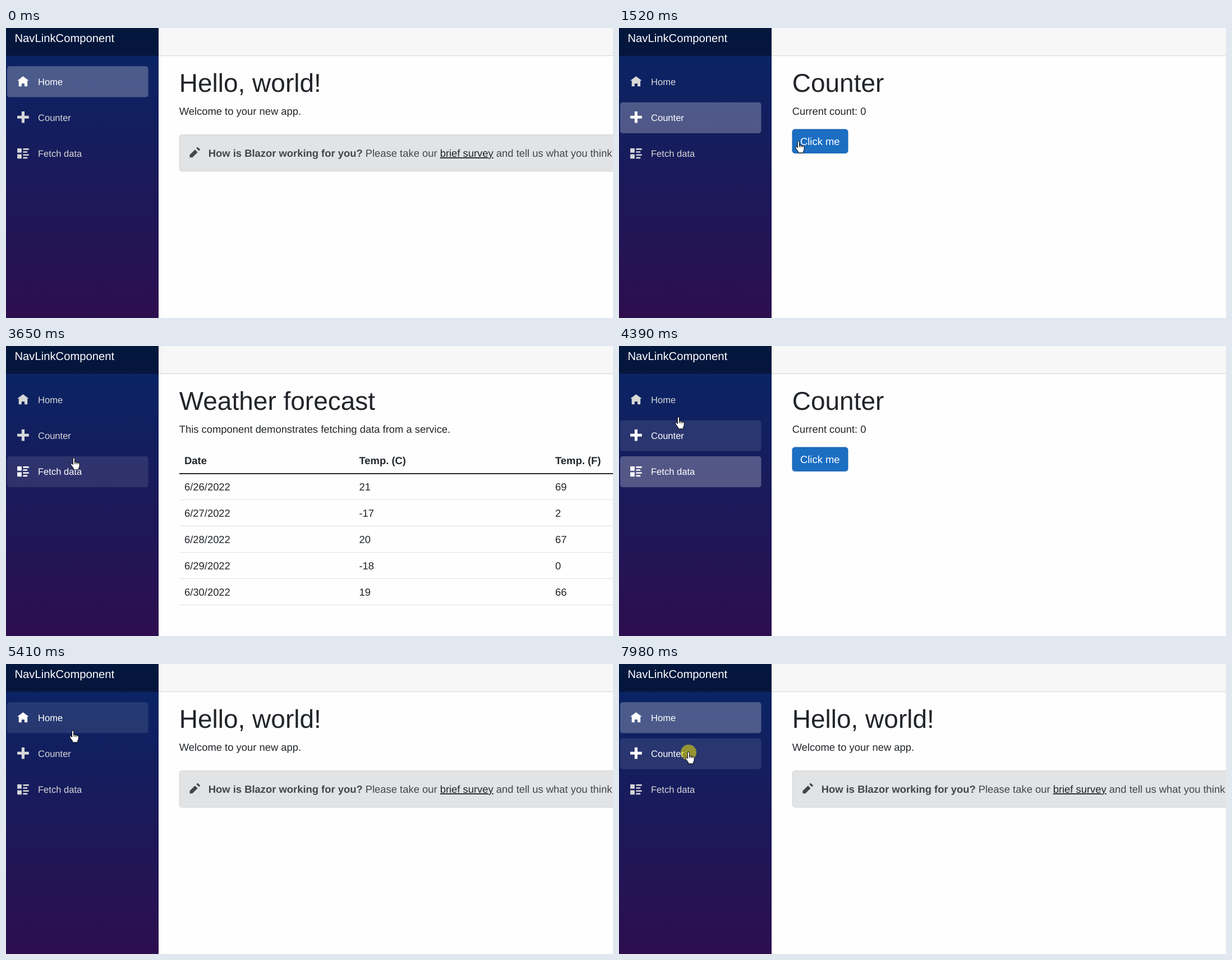
These frames come from a looping animation (1082 by 518 pixels, 8 s). An HTML page:

```html
<!DOCTYPE html>
<html lang="en">
<head>
<meta charset="utf-8">
<title>NavLinkComponent</title>
<style>
  html, body { margin: 0; height: 100%; overflow: hidden; }
  svg { display: block; width: 100vw; height: 100vh; cursor: default;
        font: 18.4px "Liberation Sans", Arial, sans-serif; text-rendering: geometricPrecision; }
  #pages { fill: #212529; }
  .h1 { font-size: 46px; }
  .alert { fill: #41464b; }
  .link { fill: #212529; text-decoration: underline; }
  .nav { font-size: 16.56px; fill: #d7d7d7; }
  .nav rect { fill: #fff; fill-opacity: 0; }
  .nav.active, .nav.hover { fill: #fff; }
  .nav.active rect { fill-opacity: .26; }
  .nav.hover rect { fill-opacity: .1; }
</style>
</head>
<body>
<svg viewBox="0 0 1082 518">
  <defs>
    <linearGradient id="side" gradientUnits="userSpaceOnUse" x1="0" y1="-15" x2="0" y2="690">
      <stop stop-color="#052767"/><stop offset="1" stop-color="#3a0647"/>
    </linearGradient>
  </defs>
  <rect width="1082" height="518" fill="#fefefe"/>
  <rect x="272" width="810" height="49" fill="#f7f7f7"/>
  <rect x="272" y="49" width="810" height="1" fill="#d6d5d5"/>
  <rect width="272" height="518" fill="url(#side)"/>
  <rect width="272" height="49.5" fill-opacity=".4"/>
  <text x="15.5" y="25" font-size="20.24" fill="#fff">NavLinkComponent</text>
  <g id="nav"></g>

  <g id="pages">
    <g>
      <text class="h1" x="308.7" y="114">Hello, world!</text>
      <text x="308.7" y="155">Welcome to your new app.</text>
      <rect x="309" y="190.5" width="900" height="65.5" rx="4.6" fill="#e2e3e5" stroke="#d3d6d8"/>
      <path class="alert" transform="translate(327.5 212.5) scale(2.35)" d="M6 0l-1 1 2 2 1-1-2-2zm-2 2l-4 4v2h2l4-4-2-2z"/>
      <text class="alert" x="360.8" y="230"><tspan font-weight="bold">How is Blazor working for you?</tspan> Please take our <tspan class="link">brief survey</tspan> and tell us what you think.</text>
    </g>
    <g>
      <text class="h1" x="308.7" y="114">Counter</text>
      <text id="count" x="308.7" y="155"></text>
      <rect x="309" y="181" width="99" height="42.6" rx="4.6" fill="#1b6ec2" stroke="#1861ac"/>
      <text x="323" y="209" fill="#fff">Click me</text>
    </g>
    <g id="weather">
      <text class="h1" x="308.7" y="114">Weather forecast</text>
      <text x="308.7" y="155">This component demonstrates fetching data from a service.</text>
    </g>
  </g>

  <circle id="press" r="14" fill="#ebe100" fill-opacity=".55"/>
  <g id="cursor" fill="#fff" stroke="#000" stroke-linejoin="round">
    <path d="M0 0V17l4-3.7 2.7 6 2.6-1.1-2.6-5.9h5.4z"/>
    <path d="M-1.7 .5a1.6 1.6 0 0 1 3.2 0V6l2 .4 2.5.6 2.3.7 1.8 1.5v5l-1.5 3v2.8H-.6V17.5L-4.5 12.5-5.6 10c0-1.6 1.8-1.6 2.6-.6l1.3 1.6zM1.5 6v4M4.2 6.6v3.6M6.8 7.3v3"/>
  </g>
</svg>
<script>
const LOOP = 8000, PRESS = 140, NAV_LAG = 100, APPEAR = 200;
const HOME = 0, COUNTER = 1, FETCH = 2;
const PITCH = 64.4, ROW = 47.1;
const $ = id => document.getElementById(id);
const show = (el, on) => el.setAttribute('visibility', on ? 'visible' : 'hidden');

// Label, icon height in units, icon path
const links = [
  ['Home', 7, 'M4 0l-4 3h1v4h2v-2h2v2h2v-4.03l1 .03-4-3z'],
  ['Counter', 8, 'M3 0v3h-3v2h3v3h2v-3h3v-2h-3v-3h-2z'],
  ['Fetch data', 7, 'M0 0v3h3v-3h-3zm4 0v1h4v-1h-4zm0 2v1h3v-1h-3zm-4 2v3h3v-3h-3zm4 0v1h4v-1h-4zm0 2v1h3v-1h-3z']
];
$('nav').innerHTML = links.map(([label, height, icon], i) => {
  const middle = 95.9 + i * PITCH;
  return `<g class="nav">
    <rect x="2" y="${middle - 27.6}" width="251.5" height="55.2" rx="4.6"/>
    <path transform="translate(20.1 ${middle - 1 - height * 1.3 + (height === 7 ? .5 : 0)}) scale(2.58)" d="${icon}"/>
    <text x="57" y="${Math.round(middle + 5.7)}">${label}</text></g>`;
}).join('');

function forecast(day) {
  const celsius = (day * 37 + 4) % 75 - 20;
  return [`6/${25 + day}/2022`, celsius, 32 + Math.trunc(celsius / .5556)];
}

function tableRow(cells, i) {
  const y = 180.5 + i * ROW, head = i === 0;
  const texts = cells.map((cell, c) =>
    `<text x="${[318, 629.5, 979][c]}" y="${Math.round(y + 30)}" font-weight="${head ? 'bold' : 'normal'}">${cell}</text>`);
  return texts.join('') + `<rect x="309" y="${Math.round(y + 46)}" width="773"
    height="${head ? 2 : 1}" fill="${head ? '#212529' : '#dee2e6'}"/>`;
}
const days = [1, 2, 3, 4, 5].map(forecast);
$('weather').innerHTML += [['Date', 'Temp. (C)', 'Temp. (F)'], ...days].map(tableRow).join('');

// Pointer glides: start, end, destination
const entry = [313, 438];
const glides = [
  [200, 900, 125, 165], [1110, 1480, 320, 203], [2290, 2850, 129, 229],
  [3580, 3930, 107, 152], [4310, 4600, 105, 102], [5230, 5410, 119, 120],
  [5410, 6040, 185, 105], [6040, 6800, 170, 168],
  [6940, 7500, 145, 182], [7500, 7980, 124, 158]
];
const visits = [[980, COUNTER], [2860, FETCH], [4190, COUNTER], [5090, HOME], [7970, COUNTER]];
const counts = [0, 1, 2, 3].map(k => 1590 + 210 * k);
const presses = [...visits.map(v => v[0]), ...counts];

// A page opens when the press on its link ends
const pageAt = t => visits.reduce((page, [at, next]) => t >= at + PRESS ? next : page, HOME);

function pointerAt(t) {
  let [x, y] = entry;
  for (const [start, end, toX, toY] of glides) {
    const p = Math.min(1, Math.max(0, (t - start) / (end - start)));
    const eased = p * (2 - p);
    x += (toX - x) * eased;
    y += (toY - y) * eased;
  }
  return [x, y];
}

const navItems = [...$('nav').children], pages = [...$('pages').children];
const [arrow, hand] = $('cursor').children;

function draw(t) {
  const page = pageAt(t), active = pageAt(t - NAV_LAG);
  const [x, y] = pointerAt(t);
  const visible = t >= APPEAR;
  const hover = visible && x < 253 ? Math.floor((y - 59.5) / PITCH) : -1;
  const onButton = page === COUNTER && x > 308 && x < 409 && y > 180 && y < 224;
  const pointing = hover in navItems || onButton;

  pages.forEach((el, i) => { el.style.display = i === page ? '' : 'none'; });
  navItems.forEach((el, i) => {
    el.classList.toggle('active', i === active);
    el.classList.toggle('hover', i === hover);
  });
  const count = t < visits[2][0] ? counts.filter(c => t >= c).length : 0;
  $('count').textContent = 'Current count: ' + count;

  for (const id of ['cursor', 'press']) $(id).setAttribute('transform', `translate(${x} ${y})`);
  show(arrow, visible && !pointing);
  show(hand, visible && pointing);
  show($('press'), presses.some(at => t >= at && t < at + PRESS));
}

const began = performance.now();
function tick(now) {
  draw(Math.max(0, now - began) % LOOP);
  requestAnimationFrame(tick);
}
draw(0);
requestAnimationFrame(tick);
</script>
</body>
</html>
```
